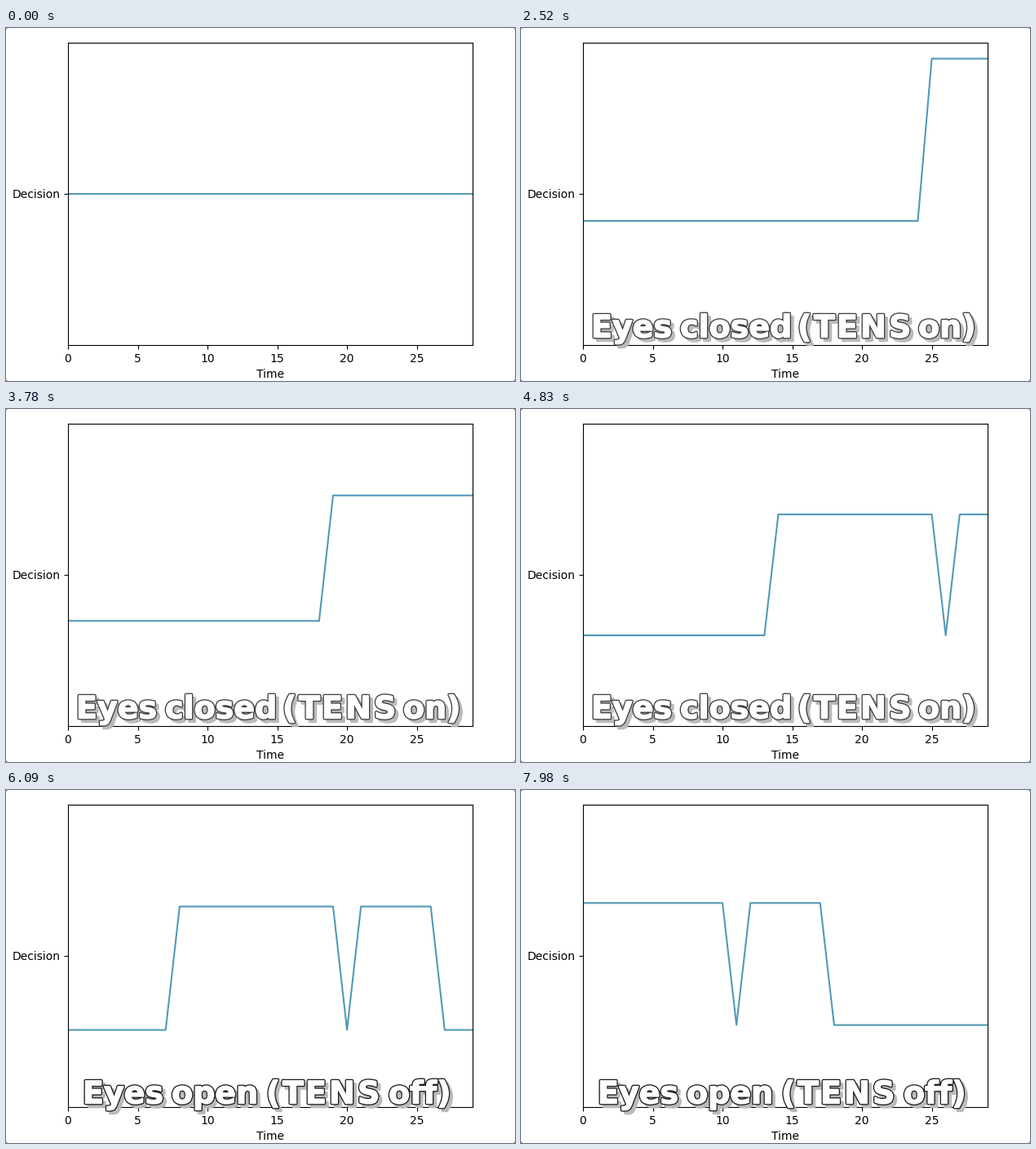
A matplotlib script for the animation above (8000 ms loop, 624 px wide and 432 px high).

```python
import numpy as np
import matplotlib.pyplot as plt
from matplotlib.animation import FuncAnimation
from matplotlib.patches import PathPatch, Polygon
from matplotlib.path import Path
from matplotlib.textpath import TextPath
from matplotlib.transforms import IdentityTransform

W, H, DPI = 624, 432, 100
LOOP, TICK = 8000, 20          # ms
WINDOW = 30                    # samples in view
ONSET, STEP = 1680, 210        # first decision and sampling period, ms
EYES_CLOSED, EYES_OPEN = 1540, 5950

plt.rcParams["font.family"] = "DejaVu Sans"
fig = plt.figure(figsize=(W / DPI, H / DPI), dpi=DPI, facecolor="white")
left, right, top, bottom = 76, 572, 18, 388
ax = fig.add_axes([left / W, 1 - bottom / H, (right - left) / W, (bottom - top) / H])
ax.set_xlim(0, WINDOW - 1)
ax.set_ylim(-2.5, 2.5)
ax.set_yticks([0], ["Decision"])
ax.set_xlabel("Time")
xs = np.arange(WINDOW)
line, = ax.plot(xs, np.zeros(WINDOW), color="#5199b6", lw=1.5)

for cx, cy in [(0, 0), (W, 0), (0, H), (W, H)]:
    dx, dy = (2 if cx == 0 else -2), (2 if cy == 0 else -2)
    fig.add_artist(Polygon([(cx, cy), (cx + dx, cy), (cx, cy + dy)], fc="#8c8c8c",
                           lw=0, transform=IdentityTransform()))


def caption(words, baseline, ink):
    """White block letters with an outline and a drop shadow."""
    font = dict(family="DejaVu Sans", weight="bold")
    parts = [TextPath((x, H - baseline), word, size=38, prop=font) for x, word in words]
    path = Path.make_compound_path(*parts)
    shadow = Path(path.vertices + [4, -4], path.codes)
    px = 72 / DPI
    layers = [(shadow, "#bababa", 3.4), (path, ink, 4.0), (path, "white", 1.4)]
    patches = []
    for z, (shape, color, width) in enumerate(layers, 2):
        patch = PathPatch(shape, fc=color, ec=color, lw=width * px, zorder=z,
                          joinstyle="round", transform=IdentityTransform())
        patches.append(fig.add_artist(patch))
    return patches


def tens(x):
    """The bracketed capitals, set with loose tracking."""
    return [(x, "("), (x + 20, "T"), (x + 48, "E"), (x + 77, "N"), (x + 112, "S")]


closed = caption([(86, "Eyes"), (195, "closed"), *tens(339), (487, "on)")],
                 378.5, "#3c3c3c")
opened = caption([(94, "Eyes"), (203, "open"), *tens(319), (469, "off)")],
                 383.5, "#1c1c1c")


def decisions(t):
    """Window of on/off decisions, scaled to zero mean and unit deviation."""
    shift = max(0, (t - ONSET) // STEP + 1)
    j = xs - WINDOW + shift
    on = ((j >= 0) & (j < 19) & (j != 12)).astype(float)
    spread = on.std()
    return (on - on.mean()) / spread if spread else on


def update(n):
    t = n * TICK + TICK // 2
    line.set_ydata(decisions(t))
    for patch in closed:
        patch.set_visible(EYES_CLOSED <= t < EYES_OPEN)
    for patch in opened:
        patch.set_visible(t >= EYES_OPEN)
    return [line, *closed, *opened]


anim = FuncAnimation(fig, update, frames=LOOP // TICK, interval=TICK,
                     init_func=lambda: update(0), repeat=True, repeat_delay=0)
plt.show()
```
